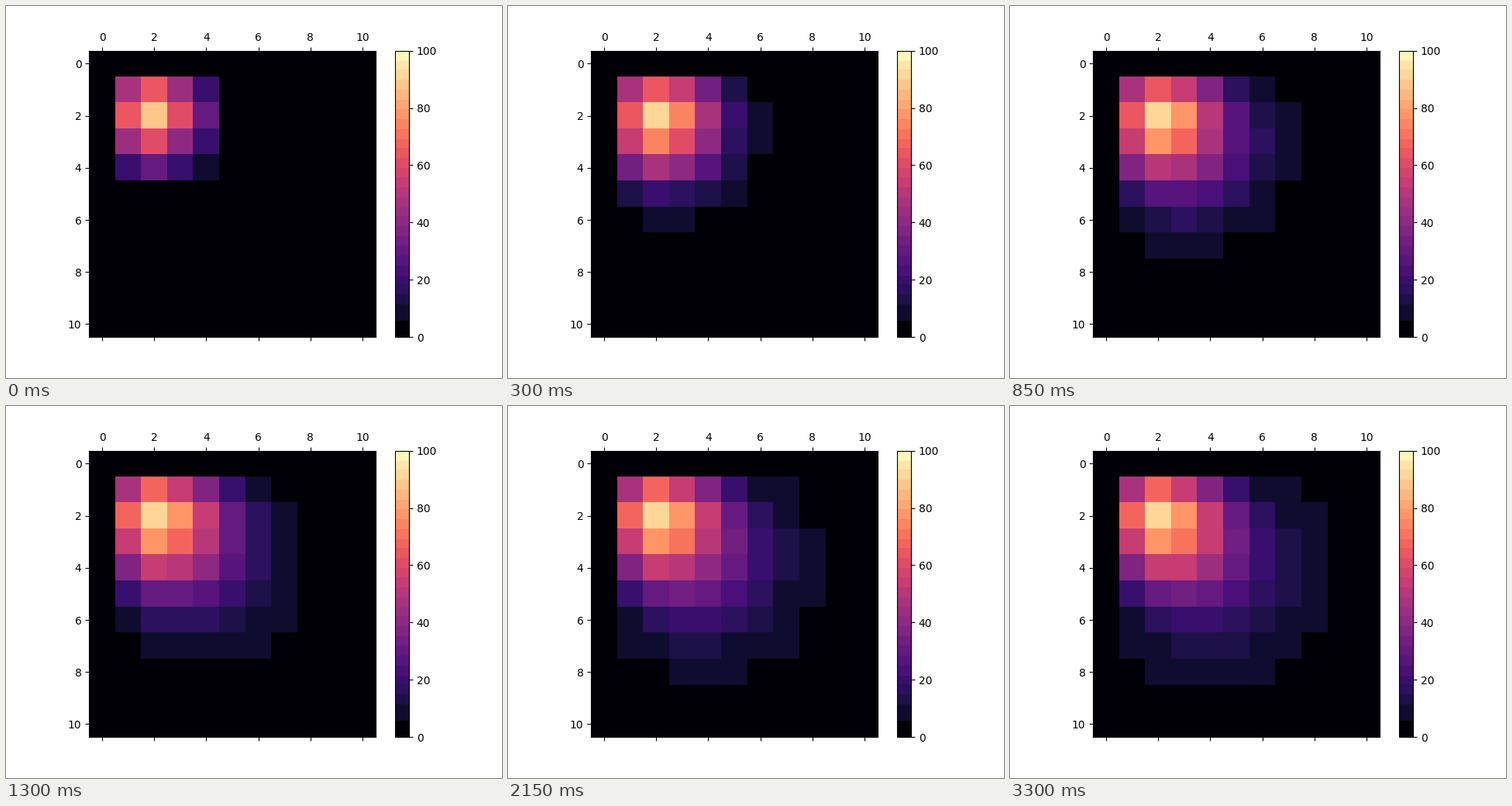
Animation, 640 px wide and 480 px high, one loop 10 s. Source, as a matplotlib script:

```python
import matplotlib.pyplot as plt
import numpy as np
from matplotlib.animation import FuncAnimation
from matplotlib.colors import ListedColormap

SIZE = 11
FRAMES, INTERVAL = 200, 50
HEATER = slice(1, 4)     # rows and columns of the heated square
GRIP = 0.95              # how firmly the heater holds its temperature
SPEED = 0.6              # share of the spreading done per step
KEEP = 0.992             # heat left after each spreading
NEAR, FAR = 0.303, 0.03  # spread to the first and second neighbour


def spread_matrix():
    spread = (1 - 2 * NEAR - 2 * FAR) * np.eye(SIZE)
    for step, share in ((1, NEAR), (2, FAR)):
        spread += share * (np.eye(SIZE, k=step) + np.eye(SIZE, k=-step))
    return spread


def heat_and_spread(u, spread):
    """Warm the heater, spread its heat and cool the rim to zero."""
    row, col = np.mgrid[HEATER, HEATER]
    heat = 104 + 6 * (4 - row - col)
    warm = u.copy()
    warm[HEATER, HEATER] += GRIP * (heat - warm[HEATER, HEATER])
    out = np.zeros_like(u)
    out[1:-1, 1:-1] = (spread @ warm @ spread)[1:-1, 1:-1]
    return out


def simulate():
    spread = spread_matrix()
    states = [heat_and_spread(np.zeros((SIZE, SIZE)), spread)]
    for _ in range(FRAMES - 1):
        u = states[-1]
        states.append(u + SPEED * (KEEP * heat_and_spread(u, spread) - u))
    return states


def stepped_magma():
    """Magma in flat bands, wider at the dark end."""
    edges = np.r_[0, 6, np.linspace(11.4, 100, 27)]
    mids = (edges[:-1] + edges[1:]) / 2
    mids[0] = 1
    levels = (np.arange(256) + 0.5) / 2.56
    band = np.searchsorted(edges, levels) - 1
    return ListedColormap(plt.get_cmap("magma")(mids[band] / 100))


states = simulate()
fig, ax = plt.subplots(figsize=(6.4, 4.8), dpi=100)
image = ax.matshow(states[0], cmap=stepped_magma(), vmin=0, vmax=100)
fig.colorbar(image)


def update(i):
    image.set_data(states[i])
    return [image]


anim = FuncAnimation(fig, update, frames=FRAMES, interval=INTERVAL, repeat=True)
plt.show()
```
